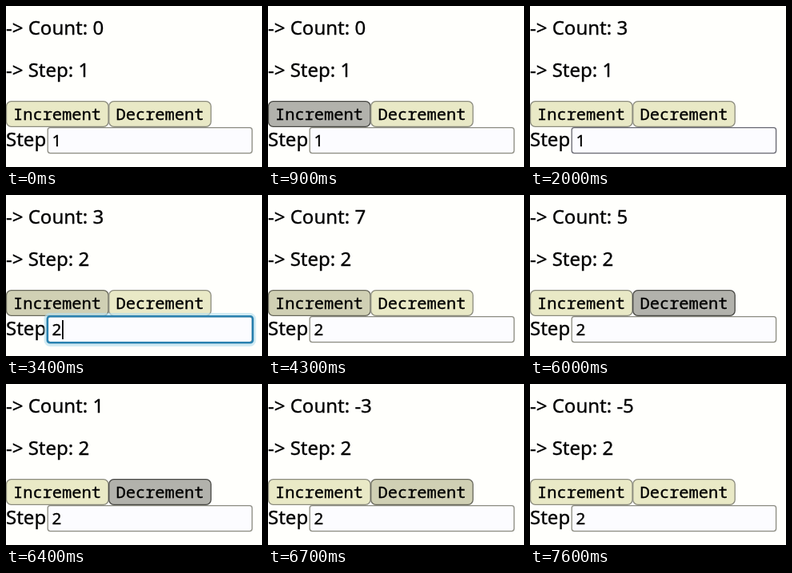
An HTML page that plays this animation: 320x202 px, repeating every 8.8 s.

```html
<!DOCTYPE html>
<html lang="en">
<head>
<meta charset="utf-8">
<title>Counter</title>
<style>
  html, body { margin: 0; width: 100%; height: 100%; overflow: hidden; background: #fffffc; }
  svg { display: block; width: 100%; height: 100%; }
  text { font: 24px "Noto Sans", sans-serif; fill: #000; stroke: #000; stroke-width: .35; }
  .button rect { fill: #e9e9c6; stroke: #8b8b7e; }
  .button.hover rect { fill: #d0d0b4; stroke: #68685c; }
  .button.press rect { fill: #b2b2ac; stroke: #484844; }
  .button text { font: 20.4px "Noto Sans Mono", monospace; text-anchor: middle; }
  #value { font-size: 20.5px; }
  #box { fill: #fcfcff; stroke: #8b8b80; stroke-width: 1.3; }
  #field.hover #box { stroke: #676770; }
  #ring, #glow, #caret, #selection { visibility: hidden; }
  #field.focus :is(#ring, #glow), #field.caret #caret, #field.select #selection { visibility: visible; }
  #ring { fill: none; stroke: #2a82b0; stroke-width: 2.6; }
  #glow { fill: none; stroke: #b9e0ef; stroke-width: 7; opacity: .65; }
  #selection { fill: #3584c4; }
  #field.select #value { fill: #fff; stroke: #fff; }
</style>
</head>
<body>
<svg viewBox="0 0 320 202">
  <text id="count" x="0" y="36"></text>
  <text id="step" x="0" y="89"></text>
  <g id="increment" class="button">
    <rect x=".5" y="119.7" width="127.5" height="31.6" rx="6" stroke-width="1.3"/>
    <text x="64" y="143">Increment</text>
  </g>
  <g id="decrement" class="button">
    <rect x="128.7" y="119.7" width="127.5" height="31.6" rx="6" stroke-width="1.3"/>
    <text x="192.5" y="143">Decrement</text>
  </g>
  <text x="0" y="176">Step</text>
  <g id="field">
    <rect id="glow" x="51" y="151.5" width="258" height="35" rx="4"/>
    <rect id="box" x="52.2" y="152.6" width="255.4" height="32" rx="3"/>
    <rect id="ring" x="51.8" y="152.3" width="256.6" height="33" rx="3"/>
    <rect id="selection" x="57.5" y="157" width="12" height="24"/>
    <text id="value" x="57.5" y="176"></text>
    <rect id="caret" x="70" y="157" width="1.8" height="24"/>
  </g>
</svg>
<script>
const LOOP = 8800;

// Each track lists [start in ms, value], held until the next entry.
const tracks = {
  count: [[0, 0], [1000, 1], [1300, 2], [1700, 3], [4000, 5], [4300, 7], [4700, 9],
    [5500, 7], [5800, 5], [6100, 3], [6300, 1], [6500, -1], [6700, -3], [7000, -5]],
  step: [[0, 1], [3200, 2]],
  increment: [[0, ''], [500, 'hover'], [900, 'press'], [1000, 'hover'], [1600, 'press'],
    [1700, 'hover'], [2000, ''], [3400, 'hover'], [3900, 'press'], [4000, 'hover'],
    [4600, 'press'], [4700, 'hover'], [5200, '']],
  decrement: [[0, ''], [5200, 'hover'], [6000, 'press'], [6100, 'hover'], [6200, 'press'],
    [6300, 'hover'], [6400, 'press'], [6500, 'hover'], [6600, 'press'], [6700, 'hover'], [7400, '']],
  field: [[0, ''], [300, 'hover'], [500, ''], [2000, 'hover'], [2400, 'focus caret'],
    [2500, 'focus select'], [3200, 'focus caret'], [3900, '']]
};

const el = id => document.getElementById(id);
const at = (name, time) => tracks[name].findLast(([start]) => start <= time)[1];

function draw(now) {
  const time = now % LOOP;
  const step = at('step', time);
  el('count').textContent = `-> Count: ${at('count', time)}`;
  el('step').textContent = `-> Step: ${step}`;
  el('value').textContent = step;
  for (const id of ['increment', 'decrement']) {
    el(id).setAttribute('class', `button ${at(id, time)}`);
  }
  el('field').setAttribute('class', at('field', time));
}

const begin = performance.now();
function tick() {
  draw(performance.now() - begin);
  requestAnimationFrame(tick);
}
tick();
</script>
</body>
</html>
```
